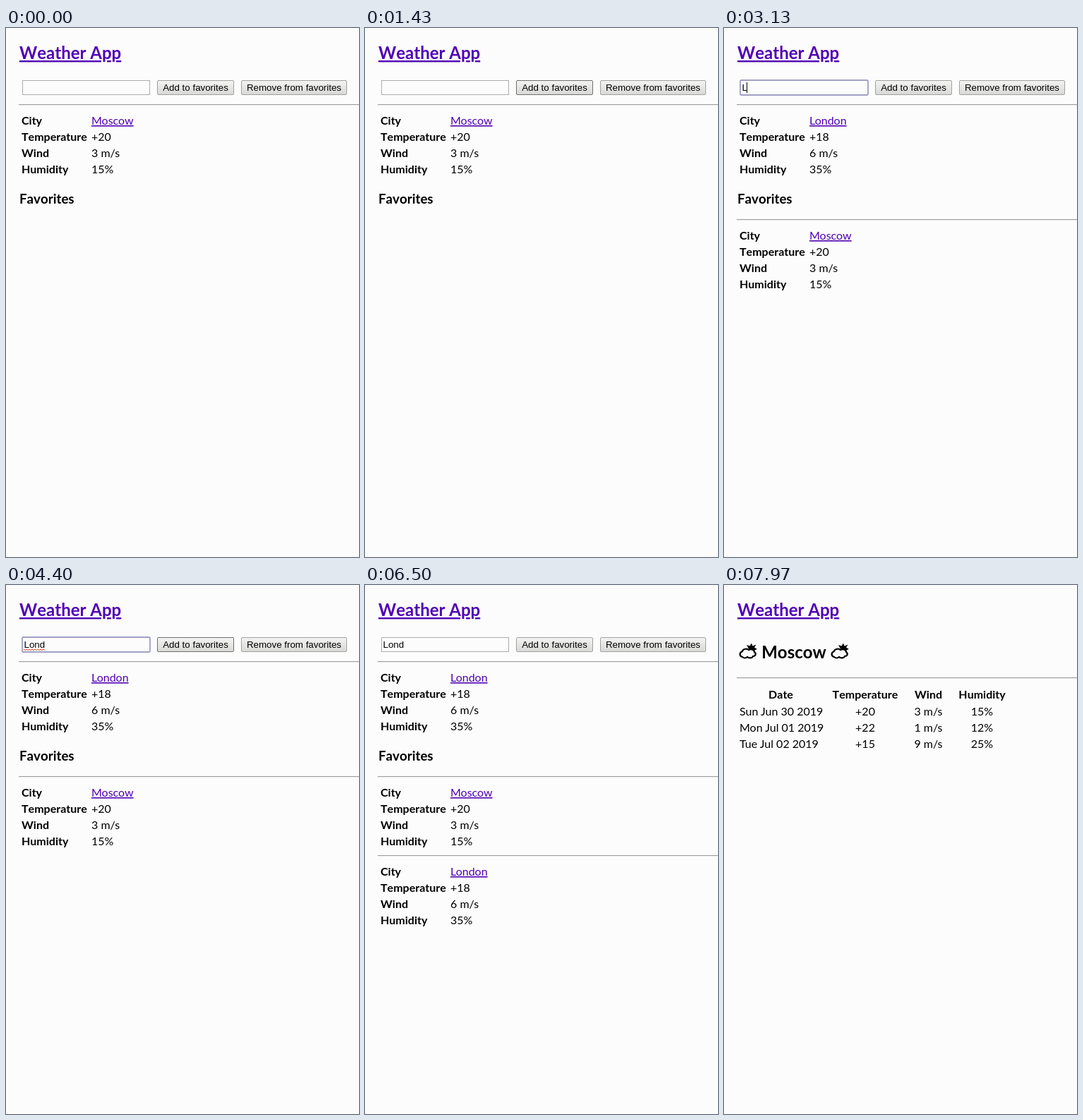
An HTML page that plays this animation: 500x750 px, repeating every 8000 ms.

```html
<!DOCTYPE html>
<html lang="en">
<head>
<meta charset="utf-8">
<title>Weather App</title>
<style>
html, body { margin: 0; width: 100%; height: 100%; overflow: hidden; background: #fcfcfc; }
svg { display: block; width: 500px; height: 750px; font: 16px Lato, sans-serif; }
.b { font-weight: 700; font-kerning: none; }
.h1 { font-size: 24px; }
.h3 { font-size: 18.72px; }
.a { fill: #5000b4; text-decoration: underline; text-decoration-thickness: .07em; text-underline-offset: .08em; }
.m { text-anchor: middle; }
.ui { font: 13.333px "Liberation Sans", Arial, sans-serif; }
</style>
</head>
<body>
<svg id="stage" viewBox="0 0 500 750">
  <defs>
    <linearGradient id="face" x2="0" y2="1">
      <stop stop-color="#f4f4f2"/><stop offset="1" stop-color="#d8d8d6"/>
    </linearGradient>
    <g id="weather">
      <path d="M32 85l4.5 1.5 2.5-4 1.5 4 5-2-2.5 4 4 2.5-4 1.5 1 4-4-1-5-5z"/>
      <path d="M26 102c-4-1-5-6 0-8 1-4 7-4 9-2 4-2 8 0 8 3 3 2 2 6-2 6-1 3-6 3-8 1-2 2-5 2-7 0z" fill="#fcfcfc" stroke="#000" stroke-width="2.2"/>
    </g>
  </defs>
  <g id="view"></g>
</svg>
<script>
const LOOP = 8000;
const CITIES = {
  Moscow: ['+20', '3 m/s', '15%'],
  London: ['+18', '6 m/s', '35%']
};
const FORECAST = [
  ['Sun Jun 30 2019', '+20', '3 m/s', '15%'],
  ['Mon Jul 01 2019', '+22', '1 m/s', '12%'],
  ['Tue Jul 02 2019', '+15', '9 m/s', '25%']
];
const KEYS = [2930, 3200, 3400, 3530];
const CENTERS = [80.5, 200, 289.5, 365.5];

const view = document.getElementById('view');
const text = (x, y, s, cls = '') => `<text x="${x}" y="${y}" class="${cls}">${s}</text>`;
const rect = (x, y, w, h, attrs) => `<rect x="${x}" y="${y}" width="${w}" height="${h}" ${attrs}/>`;
const rule = y => rect(18, y, 482, 1, 'fill="#9c9c9c"') + rect(18, y + 1, 482, 1, 'fill="#eeeeee"');
const within = (t, from, to) => t >= from && t < to;

function card(name, y) {
  const [temperature, wind, humidity] = CITIES[name];
  const rows = [['City', name], ['Temperature', temperature], ['Wind', wind], ['Humidity', humidity]];
  return rule(y) + rows.map(([label, value], i) =>
    text(22, y + 29 + i * 23, label, 'b') + text(121, y + 29 + i * 23, value, i ? '' : 'a')).join('');
}

function button(x, w, label, hover) {
  return rect(x + .5, 74.5, w - 1, 20, `rx="1.5" fill="url(#face)" stroke="${hover ? '#707070' : '#a0a0a0'}"`) +
    text(x + w / 2, 89, label, 'ui m');
}

function input(s) {
  const box = s.focus
    ? rect(23, 74, 181, 21, 'rx="1.5" fill="#fcfcfc" stroke="#8484b4" stroke-width="1.4"')
    : rect(23.5, 74.5, 180, 20, 'fill="#fcfcfc" stroke="#acacac"');
  const value = 'Lond'.slice(0, s.typed);
  const end = 25.5 + s.typed * 7.415;
  const caret = s.caret ? rect(Math.floor(end), 77, 1, 15, '') : '';
  let wave = 'M25 91';
  for (let i = 0; i < 15; i++) wave += `l2 ${i % 2 ? -1.5 : 1.5}`;
  const spelling = s.squiggle ? `<path d="${wave}" fill="none" stroke="#e03c20"/>` : '';
  return box + text(25.5, 89, value, 'ui') + spelling + caret;
}

function homePage(s) {
  return input(s) +
    button(214, 109, 'Add to favorites', s.hover) +
    button(333, 150, 'Remove from favorites') +
    card(s.typed ? 'London' : 'Moscow', 108) +
    text(19, 249, 'Favorites', 'b h3') +
    (s.saved > 0 ? card('Moscow', 271) : '') +
    (s.saved > 1 ? card('London', 383) : '');
}

function cityPage() {
  const heads = ['Date', 'Temperature', 'Wind', 'Humidity'];
  return '<use href="#weather"/><use href="#weather" x="130"/>' +
    text(99, 104, 'Moscow', 'b h1 m') + rule(131) +
    heads.map((h, i) => text(CENTERS[i], 161, h, 'b m')).join('') +
    FORECAST.map((row, r) => row.map((cell, i) =>
      text(i ? CENTERS[i] : 22, 185 + r * 23, cell, i ? 'm' : '')).join('')).join('');
}

function stateAt(t) {
  return {
    city: t >= 6770,
    typed: KEYS.filter(k => t >= k).length,
    focus: within(t, 2570, 4800),
    caret: within(t, 2570, 4030) || within(t, 4570, 4800),
    squiggle: within(t, 4400, 4800),
    hover: within(t, 1330, 2000) || within(t, 3930, 5600),
    saved: (t >= 1630) + (t >= 4900)
  };
}

let shown = '';
function draw(now) {
  const s = stateAt(now % LOOP);
  const key = JSON.stringify(s);
  if (key !== shown) {
    shown = key;
    view.innerHTML = text(19, 44, 'Weather App', 'b h1 a') + (s.city ? cityPage() : homePage(s));
  }
  requestAnimationFrame(draw);
}
draw(performance.now());
</script>
</body>
</html>
```
